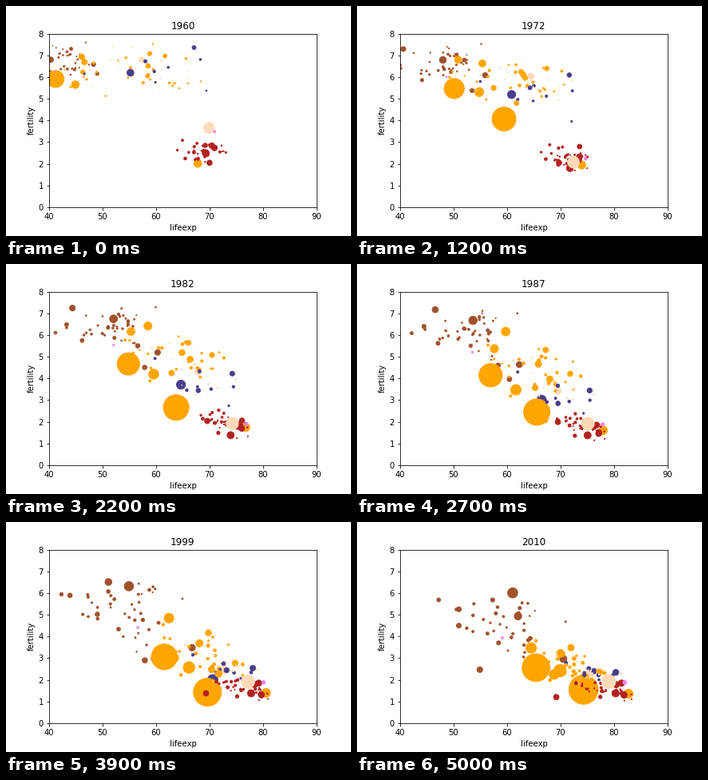
Recreate the animation shown at these times as a matplotlib script. Size 432 px wide and 288 px high, loop 5100 ms.

```python
import numpy as np
import matplotlib.pyplot as plt
from matplotlib.animation import FuncAnimation

plt.rcParams["font.family"] = "DejaVu Sans"
plt.rcParams["text.kerning_factor"] = 6

FIRST, YEARS = 1960, 51
T = np.arange(YEARS)
U = T / (YEARS - 1)

ASIA, AFRICA, EUROPE = "orange", "sienna", "firebrick"
NORTH, SOUTH, OCEANIA = "peachpuff", "darkslateblue", "violet"

rng = np.random.default_rng(21)
bubbles = []


def ease(ends, share):
    return ends[0] + (ends[1] - ends[0]) * share


def add(color, pop, life, fert, grow=1):
    """Population in millions is also the marker area in points."""
    bubbles.append((color, ease(pop, U ** grow), life, fert))


def bubble(color, pop, life, fert, mid, width=7, bend=0.75, dip=0):
    """Life rises as a power of time, fertility falls as a logistic curve.

    mid and width place the fall in years; dip is a loss of life
    expectancy that peaks in the late nineties.
    """
    loss = dip * np.exp(-((T - 38) / 7) ** 2)
    fall = 1 / (1 + np.exp((mid - T) / width))
    add(color, pop, ease(life, U ** bend) - loss, ease(fert, fall))


def path(color, pop, points, grow=1):
    """Bubble led through a few (year, life, fertility) points."""
    year, life, fert = zip(*points)
    add(color, pop, np.interp(T, year, life), np.interp(T, year, fert), grow)


def crowd(color, count, pop, growth, life, life_sd, fert, fert_sd, mid,
          bend=0.75, dip=0):
    """Small bubbles whose curves vary at random about a regional one."""
    for _ in range(count):
        z, w, late, size = np.clip(rng.normal(size=4), -1.9, 1.9)
        p = pop * np.exp(0.9 * size)
        z_end = 0.7 * z + 0.7 * w
        lag = 0.8 * late - 0.5 * z_end
        bubble(color, (p, p * growth),
               (life[0] + life_sd[0] * z, life[1] + life_sd[1] * z_end),
               (fert[0] + fert_sd[0] * w, fert[1] + fert_sd[1] * lag),
               mid + 6 * lag, bend=bend, dip=dip * rng.uniform(0, 2))


crowd(AFRICA, 40, 3.2, 3.3, (42.5, 60), (4.5, 5.5), (6.75, 4.2), (0.45, 0.9),
      mid=38, dip=3)

# populous places, back to front
bubble(ASIA, (27, 66), (55.4, 74), (6.4, 1.5), mid=16, width=5.5)
bubble(ASIA, (50, 150), (46.1, 68.8), (6.95, 2.1), mid=31, width=5.5, bend=1.1)
bubble(SOUTH, (72, 195), (55.2, 74.2), (6.6, 1.6), mid=19.5, width=8, bend=0.85)
path(ASIA, (660, 1340), grow=0.75, points=[
    (0, 31.6, 4), (3, 49.5, 7), (7, 56.9, 5.26), (17, 61.95, 2.87),
    (31, 67, 2.28), (39, 69.6, 1.43), (50, 74.3, 1.55)])
bubble(AFRICA, (28, 78), (48.3, 70.5), (6.8, 2.7), mid=26, width=9)
bubble(AFRICA, (22, 87), (38.5, 62.2), (7.3, 3.5), mid=47, width=6, bend=1.7,
       dip=3)
bubble(ASIA, (450, 1206), (41.2, 65.4), (6.1, 2.3), mid=26.5, width=9, bend=0.7)
bubble(ASIA, (88, 240), (44.9, 69.9), (5.7, 2.4), mid=23, width=5.5, bend=0.65)
bubble(ASIA, (93, 127), (67.8, 82.7), (2.03, 1.35), mid=24, width=6, bend=0.62)
bubble(NORTH, (38, 118), (57.3, 75.4), (6.95, 2.25), mid=20.5, width=6,
       bend=0.65)
bubble(AFRICA, (45, 159), (40.3, 61.2), (6.8, 5.9), mid=38, width=6, bend=0.7,
       dip=3)
bubble(ASIA, (46, 173), (46.6, 64.5), (6.7, 2.7), mid=40, bend=0.5)
bubble(ASIA, (26, 93), (58.8, 70), (7.7, 2.9), mid=21, width=11)
path(AFRICA, (17, 50), points=[
    (0, 49, 6.15), (17, 55.3, 5.05), (31, 62.5, 3.53), (39, 57.9, 2.9),
    (50, 54.9, 2.47)])
bubble(ASIA, (28, 72), (46.3, 74.6), (6.5, 2), mid=22, width=8, bend=0.65)
bubble(SOUTH, (16, 46), (58, 76.3), (6.9, 2.4), mid=16, width=5)

crowd(ASIA, 27, 5, 2.8, (55, 72.5), (8, 4), (6.5, 2.5), (0.7, 0.6), mid=27,
      bend=0.7)
crowd(SOUTH, 8, 4, 2.4, (58, 74.5), (6, 2.5), (6.3, 2.4), (0.8, 0.3), mid=20)
crowd(NORTH, 18, 0.8, 2, (58, 74), (5.5, 3), (6.6, 2.4), (0.6, 0.4), mid=19)
crowd(EUROPE, 31, 5.5, 1.15, (68.5, 77.5), (2.4, 2.9), (2.6, 1.5),
      (0.35, 0.2), mid=20, bend=1)

# a few larger bubbles among the low-fertility group
bubble(EUROPE, (46, 63), (70.4, 81.4), (2.85, 1.85), mid=11, width=2.5, bend=0.9)
bubble(EUROPE, (73, 82), (69.3, 80.3), (2.5, 1.38), mid=11, width=2, bend=1.05)
bubble(EUROPE, (50, 60), (69.2, 81.8), (2.5, 1.32), mid=19, width=4)
bubble(EUROPE, (30, 46), (69.2, 81.9), (2.85, 1.28), mid=22, width=3)
bubble(EUROPE, (43, 46), (70, 69.2), (2.05, 1.2), mid=35, width=3)
bubble(EUROPE, (52, 62), (70.9, 80.4), (2.75, 1.78), mid=11, width=2.5, bend=0.95)
bubble(OCEANIA, (10, 22), (70.9, 82), (3.6, 1.88), mid=8, width=3)
bubble(OCEANIA, (2, 7), (41, 59.1), (6.4, 3.6), mid=30, width=10, bend=0.6)
bubble(NORTH, (180, 310), (69.9, 79), (3.95, 1.92), mid=5, width=2.8, bend=0.9)
bubble(ASIA, (33, 87), (58.5, 75), (6.6, 1.7), mid=26, width=6.5, bend=0.9)

colors, *values = zip(*bubbles)
POP, LIFE, FERT = map(np.array, values)

fig, ax = plt.subplots(figsize=(6, 4), dpi=72)
fig.subplots_adjust(left=0.125, right=0.9, bottom=0.125, top=0.88)
ax.set(xlim=(40, 90), ylim=(0, 8), xlabel="lifeexp", ylabel="fertility")
title = ax.set_title(str(FIRST), fontsize=12)
dots = ax.scatter(LIFE[:, 0], FERT[:, 0], s=POP[:, 0], c=colors)


def draw(i):
    dots.set_offsets(np.column_stack((LIFE[:, i], FERT[:, i])))
    dots.set_sizes(POP[:, i])
    title.set_text(str(FIRST + i))
    return dots, title


anim = FuncAnimation(fig, draw, frames=YEARS, interval=100, repeat=True,
                     repeat_delay=0, blit=False)
plt.show()
```
